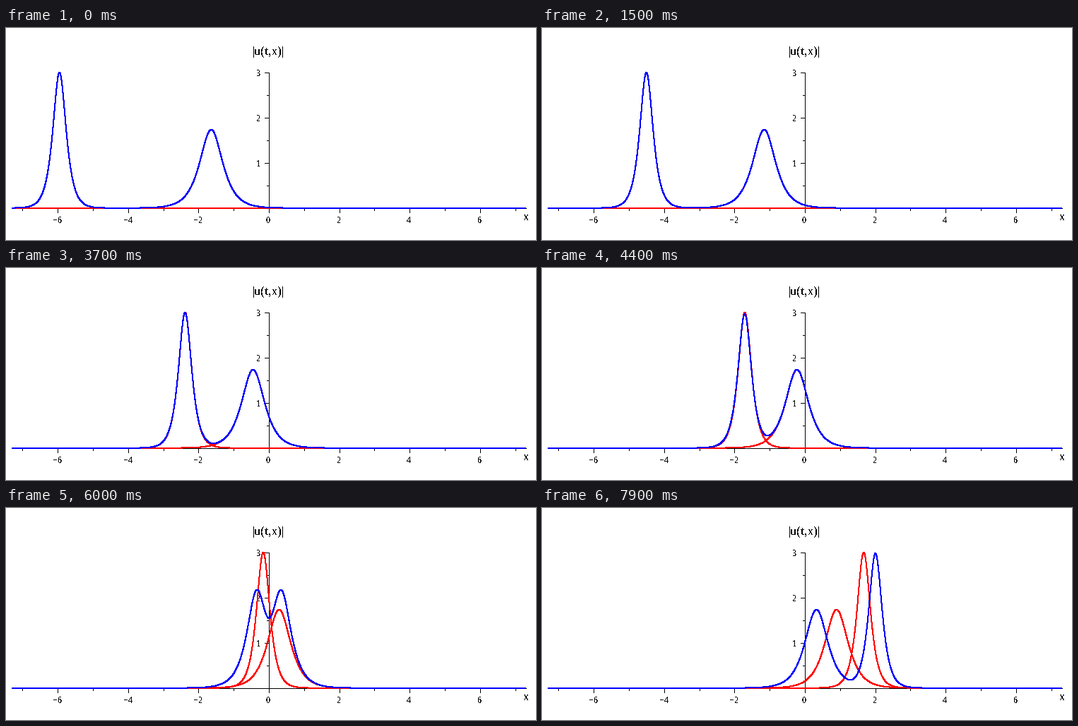
Write a matplotlib script that moves like this. It is 750 px wide and 300 px high and loops after 8000 ms.

```python
import numpy as np
import matplotlib.pyplot as plt
from matplotlib.animation import FuncAnimation

plt.rcParams.update({"path.simplify": False, "text.antialiased": False,
                     "text.hinting": "native", "text.hinting_factor": 1})

W, H, DPI = 750, 300, 100
FRAMES, INTERVAL = 80, 100
PT = 72 / DPI                     # points per pixel

X0, XS = 372, 49.8                # origin and pixels per unit in x
Y0, YS = 255, 64                  # origin and pixels per unit in y

# Two solitons of the Sasa-Satsuma equation, height k/2, speed k^2
K1, K2 = 6.0, np.sqrt(12.0)
ANGLE = np.radians(153)           # relative phase
DT, T_MEET = 0.00268, 60
C = np.cos(ANGLE)
R = ((K1 - K2) / (K1 + K2)) ** 2
D = 1 - C ** 2 * (1 - R)
OFFSET = np.log(D / R) / 4        # centres the collision at x = 0, t = 0
SHIFT = -np.log(R * D) / 4        # half of the position shift, times k

x = np.linspace(-7.31, 7.31, 7311)


def grid(v):
    """Round to pixel edges, so that a two pixel pen stays crisp."""
    return np.floor(v) + 0.5


px = grid(X0 - 0.3 + XS * x)


def to_px(u):
    return grid(Y0 - 0.8 - YS * u)


def soliton(k, t, shift):
    return k / 2 / np.cosh(k * (x - k * k * t) + shift)


def collision(t):
    n1 = (K1 * (x - K1 ** 2 * t) + OFFSET) / 2
    n2 = (K2 * (x - K2 ** 2 * t) + OFFSET) / 2
    m11 = np.cosh(2 * n1) / K1
    m22 = np.cosh(2 * n2) / K2
    m12 = (np.exp(n1 + n2) + C * np.exp(-n1 - n2)) / (K1 + K2)
    det = m11 * m22 - m12 ** 2
    a = m22 - m12 * np.exp(n2 - n1)
    b = m11 - m12 * np.exp(n1 - n2)
    return np.abs(a + b * np.exp(-1j * ANGLE)) / (2 * det)


fig = plt.figure(figsize=(W / DPI, H / DPI), dpi=DPI, facecolor="white")
ax = fig.add_axes([0, 0, 1, 1])
ax.set_xlim(-0.5, W - 0.5)
ax.set_ylim(H - 0.5, -0.5)
ax.axis("off")


def rule(xs, ys):
    ax.plot(xs, ys, color="black", lw=PT, snap=False,
            solid_capstyle="projecting", zorder=1)


def label(lx, ly, text, size):
    ax.text(lx, ly, text, fontsize=size * PT, family="Liberation Serif",
            color="black", ha="center", va="baseline", zorder=1)


def curve(color, z):
    return ax.plot([], [], color=color, lw=2 * PT, snap=False,
                   solid_joinstyle="miter", solid_capstyle="butt", zorder=z)[0]


rule([8, 736], [Y0, Y0])
rule([X0, X0], [Y0 - 3 * YS, Y0])

for i in range(-7, 8):
    tx = round(X0 + XS * i)
    rule([tx, tx], [Y0, Y0 + (3 if i % 2 else 6)])
    if i % 2 == 0:
        label(tx - (0.5 if i < 0 else 1.5), 275.5, str(i).replace("-", "\u2212"), 13)

for i in range(1, 7):
    ty = Y0 - YS * i // 2
    rule([X0 - (3 if i % 2 else 6), X0], [ty, ty])
    if i % 2 == 0:
        label(356.5, ty + 4.5, str(i // 2), 13)

label(371, 38, "|u(t,x)|", 18)
label(735, 272, "x", 18)

tall, small, both = curve("#ff0000", 2), curve("#ff0000", 2), curve("#0000ff", 3)


def update(n):
    t = (n - T_MEET) * DT
    tall.set_data(px, to_px(soliton(K1, t, SHIFT)))
    small.set_data(px, to_px(soliton(K2, t, -SHIFT)))
    both.set_data(px, to_px(collision(t)))
    return tall, small, both


anim = FuncAnimation(fig, update, frames=FRAMES, interval=INTERVAL,
                     repeat=True, repeat_delay=0, blit=False)
plt.show()
```
